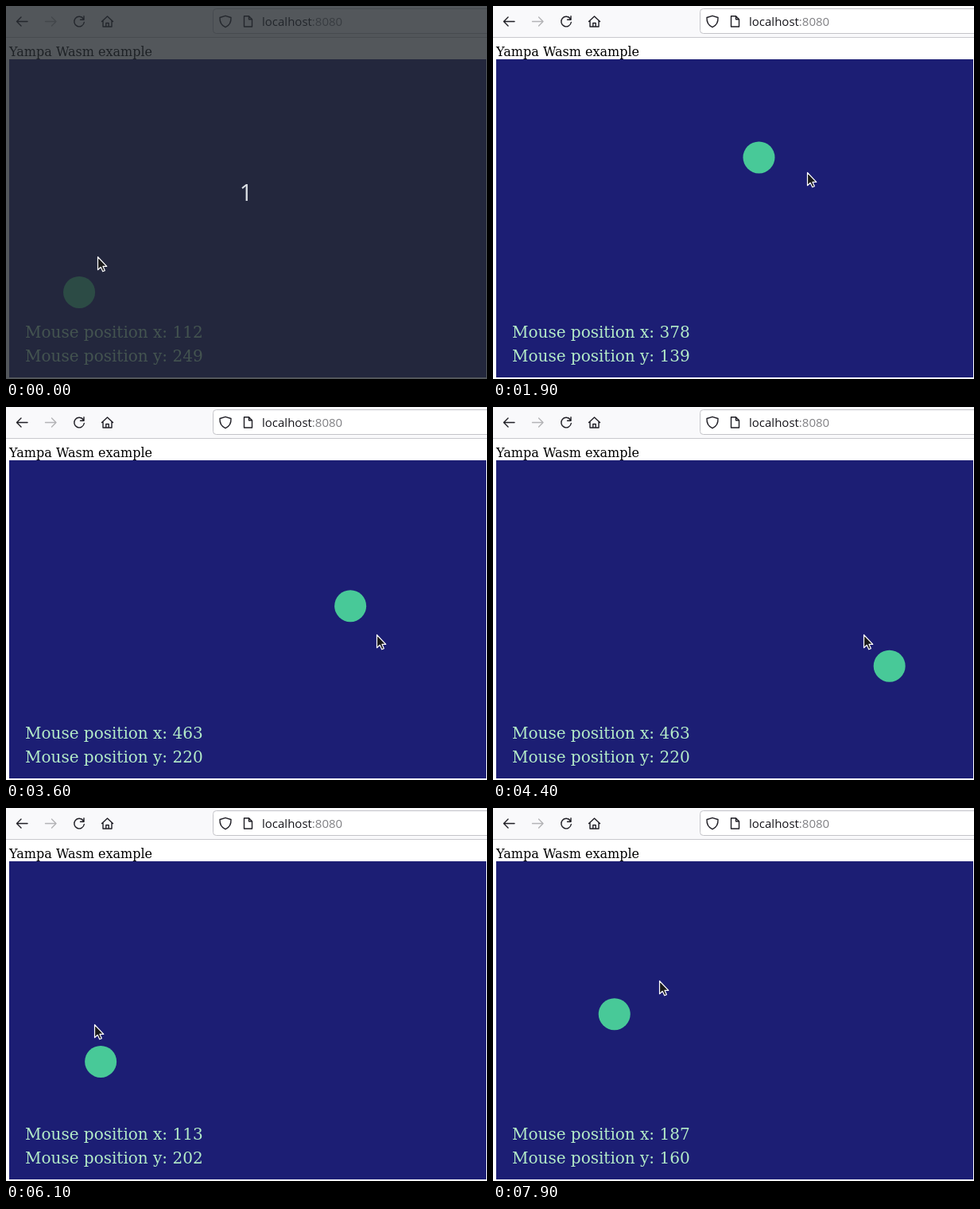
Animation, 605 px wide and 469 px high, one loop 8 s. Source, as an HTML page:

```html
<!DOCTYPE html>
<html lang="en">
<head>
<meta charset="utf-8">
<title>Yampa Wasm example</title>
<style>
  html, body { margin: 0; width: 100%; height: 100%; overflow: hidden; background: #fff; }
  svg { display: block; width: 605px; height: 469px; }
  .icon { fill: none; stroke: #1f1e25; stroke-width: 1.4; stroke-linecap: round; stroke-linejoin: round; }
  .off { stroke: #b3b3b6; }
  .url { font: 15px "Open Sans", "Noto Sans", sans-serif; fill: #15141a; }
  .port { fill: #808084; }
  .title { font: 16px "DejaVu Serif", serif; }
  .info { font: 20px "DejaVu Serif", serif; fill: #b4ecc8; }
  .count { font: 29px "Open Sans", "Noto Sans", sans-serif; fill: #dde1e6; text-anchor: middle; }
</style>
</head>
<body>
<svg viewBox="0 0 605 469">
  <rect width="605" height="469" fill="#fff"/>
  <rect width="605" height="39" fill="#f9f9fb"/>
  <rect y="39" width="605" height="1" fill="#c9c9cd"/>
  <rect x="260.5" y="3.5" width="360" height="31" rx="4" fill="#fff" stroke="#c3c3c8"/>

  <g class="icon">
    <path d="M27 19.5H13.5M19 14l-5.5 5.5L19 25"/>
    <path class="off" d="M49.500 19.500H63M57.500 14l5.500 5.500L57.500 25"/>
    <path d="M97.300 16A6.300 6.300 0 1 0 98.300 20.500M98 12.800V17.200H93.500"/>
    <path d="M120.500 19.500L127.500 13L134.500 19.500M122 18.500V26H133V18.500M125.800 26V21.500H129.200V26"/>
    <path d="M276 12.300L283 14.500C283.300 20 281 24.500 276 26.700C271 24.500 268.700 20 269 14.500Z"/>
    <path d="M299.500 12.800H305.500L309.500 16.800V26H299.500ZM305.500 12.800V16.800H309.500"/>
  </g>
  <text class="url" x="322" y="25">localhost<tspan class="port">:8080</tspan></text>

  <text class="title" x="4" y="63">Yampa Wasm example</text>
  <rect x="4" y="67" width="600" height="400" fill="#1c1e74"/>
  <text class="info" id="textX" x="24" y="417"></text>
  <text class="info" id="textY" x="24" y="447"></text>
  <circle id="ball" r="20" fill="#48c998"/>

  <g id="shade">
    <rect width="605" height="469" fill="#262b30" fill-opacity=".79"/>
    <text class="count" x="302" y="245">1</text>
  </g>
  <path id="cursor" d="M0 0V16.200L3.700 12.800L6.200 18.300L8.800 17.100L6.400 11.800H11.300Z"
        fill="#1b1b1b" stroke="#fff" stroke-width="1.200" stroke-linejoin="round"/>
</svg>
<script>
  const LOOP = 8, STEP = 0.1;
  const ORIGIN = { x: 4, y: 67 };
  const ORBIT = 50, SPEED = 4;      // px, rad/s
  const LEAD = 0.04;                // the pointer runs ahead of the page, s
  const byId = id => document.getElementById(id);

  // time, x, y of the pointer
  const sweepOut = [
    [0, 116, 316], [1.2, 116, 316], [1.3, 118, 314], [1.4, 126, 306], [1.5, 147, 290],
    [1.6, 190, 262], [1.7, 250, 232], [1.8, 322, 208], [1.9, 382, 206], [2, 418, 216],
    [2.2, 452, 243], [2.4, 464, 268], [2.6, 467, 283], [2.7, 467, 285], [2.8, 467, 287]
  ];
  const sweepBack = [
    [4.7, 467, 287], [4.8, 462, 281], [5, 430, 245], [5.2, 378, 203], [5.3, 364, 194],
    [5.4, 360, 194], [5.5, 342, 196], [5.6, 305, 204], [5.8, 216, 229], [6, 140, 256],
    [6.1, 117, 269], [6.2, 104, 278], [6.3, 100, 281]
  ];
  const lastMove = [
    [7.4, 100, 281], [7.5, 101, 280], [7.6, 105, 277], [7.7, 116, 268],
    [7.8, 147, 249], [7.9, 191, 227], [8, 238, 205]
  ];
  const path = [...sweepOut, ...sweepBack, ...lastMove];

  // time, orbit phase in degrees
  const phase = [[0, 118.6], [0.9, 123], [2.8, 122.4], [4.5, 122.3], [5.4, 129.6], [8, 129.4]];

  function sample(keys, t) {
    const i = keys.findIndex(k => k[0] > t);
    if (i < 0) return keys[keys.length - 1].slice(1);
    const a = keys[i - 1], b = keys[i];
    const f = (t - a[0]) / (b[0] - a[0]);
    return a.slice(1).map((v, n) => v + (b[n + 1] - v) * f);
  }

  function draw(t) {
    const [x, y] = sample(path, t).map(Math.round);
    const [cx, cy] = sample(path, t + LEAD).map(Math.round);
    const angle = SPEED * t + sample(phase, t)[0] * Math.PI / 180;
    byId("ball").setAttribute("cx", x + ORBIT * Math.cos(angle));
    byId("ball").setAttribute("cy", y + ORBIT * Math.sin(angle));
    byId("cursor").setAttribute("transform", `translate(${cx - 0.5} ${cy - 0.5})`);
    byId("textX").textContent = "Mouse position x: " + (x - ORIGIN.x);
    byId("textY").textContent = "Mouse position y: " + (y - ORIGIN.y);
    byId("shade").style.display = t < STEP ? "" : "none";
  }

  function tick() {
    const t = (performance.now() / 1000) % LOOP;
    draw(Math.floor(t / STEP + 0.01) * STEP);
    requestAnimationFrame(tick);
  }
  tick();
</script>
</body>
</html>
```
